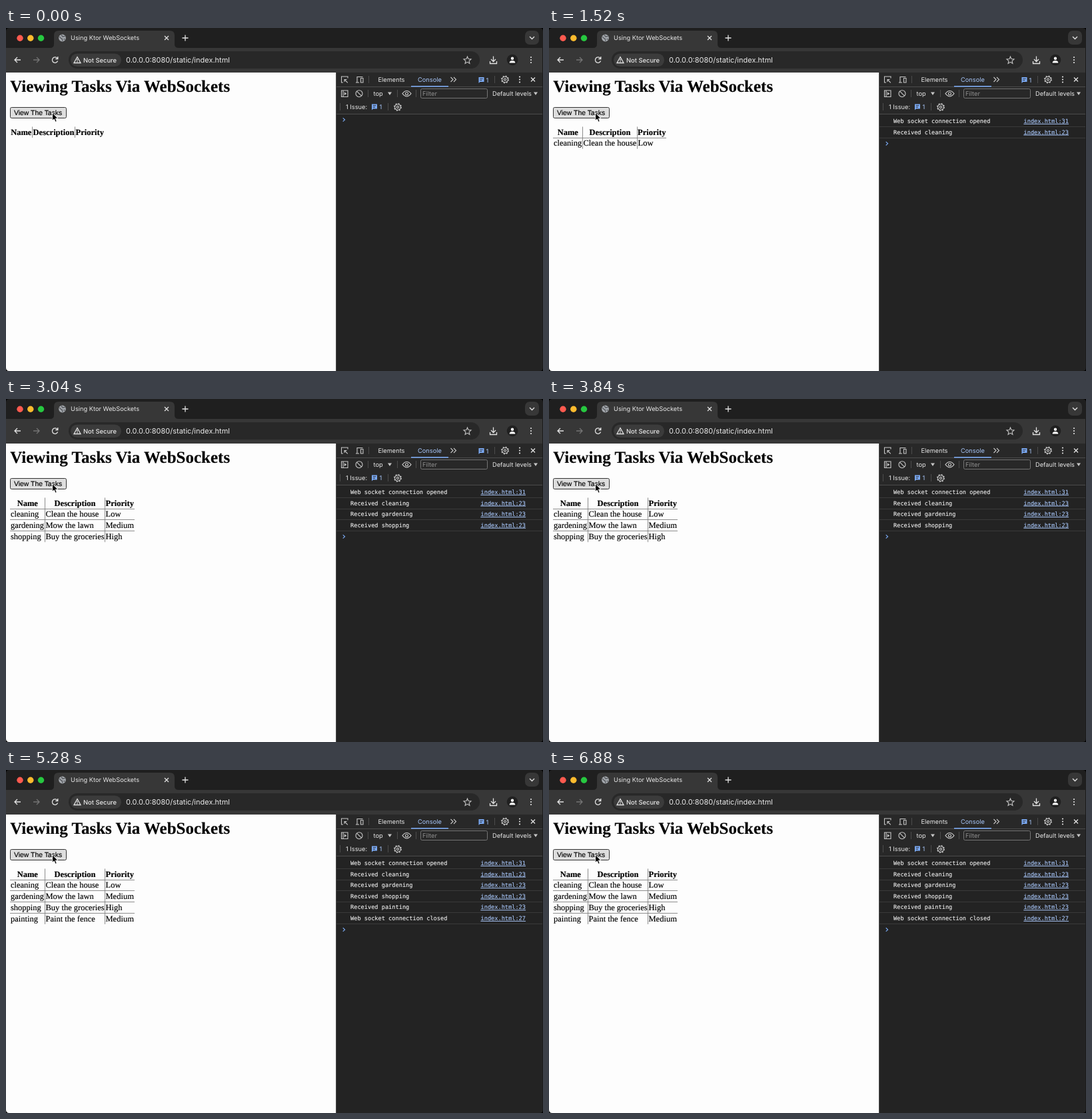
Write an HTML page that moves like this. It is 806x516 px and loops after 6.96 s.

```html
<!DOCTYPE html>
<html lang="en">
<head>
<meta charset="utf-8">
<title>Using Ktor WebSockets</title>
<style>
  html, body { margin: 0; width: 100%; height: 100%; overflow: hidden; background: #1f1f1f; }
  svg { display: block; width: 806px; height: 516px; }
  text { white-space: pre; text-rendering: geometricPrecision; }
  .ui { font: 9.25px Inter, Roboto, sans-serif; fill: #e8e8e8; }
  .ui .accent { fill: #a8c7fa; }
  .page { font: 12.5px "Liberation Serif", "Times New Roman", serif; fill: #000; }
  .page text { stroke: #000; stroke-width: .15; }
  .page .head { font-weight: bold; text-anchor: middle; }
  .page .title { font-size: 25px; font-weight: bold; }
  .page .label { font: 10.4px "Liberation Sans", Arial, sans-serif; }
  .log { font: 8.63px "DejaVu Sans Mono", monospace; fill: #f1f1f1; }
  .log text { stroke: #f1f1f1; stroke-width: .12; }
  .log .link { fill: #a8c7fa; stroke: #a8c7fa; text-decoration: underline; }
  .icon { fill: none; stroke: #c7c7c7; stroke-width: 1.1; }
  .bright { stroke: #e3e3e3; stroke-width: 1.3; }
  .blue { stroke: #7cacf8; }
  .rule { fill: none; stroke: #4c4c4c; }
  .log .rule { stroke: #3a3a3a; }
  .grid { fill: none; stroke: #808080; stroke-width: .9; }
</style>
</head>
<body>
<svg viewBox="0 0 806 516">
  <defs>
    <g id="gear" class="icon">
      <circle r="4.3"/><circle r="1.6"/>
      <circle r="5.2" stroke-width="1.5" stroke-dasharray="2 2.084"/>
    </g>
    <g id="dots" fill="#e3e3e3"><circle cy="-4" r="1.1"/><circle r="1.1"/><circle cy="4" r="1.1"/></g>
    <g id="issue">
      <path d="M-4-4H4V3H-2L-4 5Z" fill="#7cacf8"/>
      <path d="M-2.3-1.8H2.3M-2.3.6H1" stroke="#303030"/>
    </g>
    <path id="down" d="M-3-2.2H3L0 2.4Z" fill="#c7c7c7"/>
    <path id="cross" d="M-3-3 3 3M3-3-3 3"/>
  </defs>

  <!-- Tab strip -->
  <rect width="806" height="516" fill="#1f1f1f"/>
  <path d="M66 30Q72 30 72 24V11Q72 4 79 4H246Q253 4 253 11V24Q253 30 259 30Z" fill="#373737"/>
  <circle cx="21" cy="15.2" r="4.7" fill="#ff5a4f"/>
  <circle cx="36.8" cy="15.2" r="4.7" fill="#febb2e"/>
  <circle cx="52.5" cy="15.2" r="4.7" fill="#27c840"/>
  <circle cx="84.5" cy="15" r="5.4" fill="#a5a9ae"/>
  <path d="M80.5 13Q82 16 84 16L85 19.5M83 10.5 85 13 88.5 12.5M86.5 16.5 88.5 17" fill="none" stroke="#55585c" stroke-width="1.4"/>
  <text class="ui" x="97" y="18.2">Using Ktor WebSockets</text>
  <use href="#cross" x="241" y="15" class="icon bright"/>
  <path class="icon bright" d="M264.5 15H273.5M269 10.5V19.5"/>
  <rect x="779" y="4" width="21" height="21" rx="7" fill="#373737"/>
  <path class="icon bright" d="M786 13 789.5 16.5 793 13"/>

  <!-- Toolbar -->
  <rect y="30" width="806" height="37" fill="#373737"/>
  <path class="icon bright" d="M22 48H13M17 44 13 48 17 52"/>
  <path class="icon bright" d="M41 48H50M46 44 50 48 46 52" style="stroke:#747474"/>
  <path class="icon bright" d="M77.3 46A4.2 4.2 0 1 0 77.6 49.5M77.8 43V46.5H74.3"/>
  <rect x="94" y="35" width="617" height="26" rx="13" fill="#282828"/>
  <rect x="97" y="38.5" width="76" height="19.5" rx="9.7" fill="#3b3b3b"/>
  <path class="icon bright" d="M107 43.5 112 52.5H102ZM107 46.5V49.3M107 50V51.2"/>
  <text class="ui" x="116" y="51.6" style="font-size:9.4px;font-weight:500">Not Secure</text>
  <text class="ui" x="180" y="52" style="font-size:11px">0.0.0.0:8080/static/index.html</text>
  <path class="icon" d="M692.5 43 694 46.6 698 47 695 49.6 695.9 53.4 692.5 51.4 689.1 53.4 690 49.6 687 47 691 46.6Z"/>
  <path class="icon bright" d="M731.5 42.5V50M728 47 731.5 50.5 735 47M726.5 50V53.5H736.5V50"/>
  <circle cx="760" cy="48" r="8.3" fill="#202020"/>
  <circle cx="760" cy="45.8" r="2.2" fill="#fff"/>
  <path d="M755.6 52.5Q755.6 49 760 49T764.4 52.5Z" fill="#fff"/>
  <use href="#dots" x="788" y="48"/>

  <!-- Page -->
  <rect y="67" width="495" height="449" fill="#fdfdfd"/>
  <g class="page">
    <text class="title" x="6.2" y="95.8">Viewing Tasks Via WebSockets</text>
    <rect x="6.5" y="119.5" width="84" height="16" rx="2" fill="#dedede" stroke="#333"/>
    <text class="label" x="12" y="131.1">View The Tasks</text>
    <g id="table"></g>
  </g>
  <path d="M69.5 127.5V139.3L72.2 136.9 74.2 141.3 76.2 140.4 74.3 136.2 77.8 136Z" stroke="#fff" stroke-width=".9"/>

  <!-- Console panel -->
  <rect x="495" y="67" width="311" height="449" fill="#232323"/>
  <rect x="496" y="67" width="309" height="62" fill="#282828"/>
  <path class="rule" d="M495.5 67V516M496 88.5H805M496 129.5H805M544.5 72V83M733.5 72V83M543.5 93V104M587.5 93V104M615.5 93V104M501.5 113V124M573.5 113V124"/>
  <path d="M608 87.7H664" stroke="#7cacf8" stroke-width="1.4"/>
  <path class="icon" d="M513 75.5V73H503.5V82H506M512.8 82.3 508 77.5M508 81V77.5H511.5"/>
  <path class="icon" d="M527 81.5V73.5H535.5M525 82H530M532.5 75.5H536V82H532.5Z"/>
  <path class="icon" d="M667.5 74 671 77.5 667.5 81M672 74 675.5 77.5 672 81"/>
  <use href="#issue" x="713.5" y="78"/>
  <use href="#gear" x="749" y="77.5"/>
  <use href="#dots" x="771" y="77.5"/>
  <use href="#cross" x="791" y="77.5" class="icon bright"/>
  <path class="icon" d="M503.5 94H513V103.5H503.5ZM506 94V103.5"/>
  <path d="M507.8 96.3V101.2L511.3 98.7Z" fill="#c7c7c7"/>
  <path class="icon" d="M535 98.7A5 5 0 1 1 525 98.7A5 5 0 1 1 535 98.7M526.5 95.2 533.5 102.2"/>
  <use href="#down" x="576" y="98.7"/>
  <path class="icon" d="M595 98.7Q601.5 90.2 608 98.7Q601.5 107.2 595 98.7Z"/>
  <circle class="icon" cx="601.5" cy="98.7" r="2"/>
  <rect x="622.5" y="91.5" width="100" height="14" rx="2" fill="#282828" stroke="#757575"/>
  <use href="#down" x="795" y="98.7"/>
  <use href="#issue" x="553" y="118.5"/>
  <use href="#gear" x="588" y="119"/>
  <g class="ui">
    <text x="558.5" y="81">Elements</text>
    <text x="618" y="81" class="accent">Console</text>
    <text x="720.5" y="81.6" class="accent">1</text>
    <text x="551.5" y="102">top</text>
    <text x="625" y="102" style="fill:#8f8f8f">Filter</text>
    <text x="730" y="102">Default levels</text>
    <text x="510" y="122.3">1 Issue:</text>
    <text x="560.5" y="122.3" class="accent">1</text>
  </g>
  <g id="log" class="log"></g>
  <path d="M805.5 30V516" stroke="#1b1b1b"/>
  <path d="M0 511V516H5Q0 516 0 511M806 511V516H801Q806 516 806 511M0 5V0H5Q0 0 0 5M806 5V0H801Q806 0 806 5"/>
</svg>

<script>
  const LOOP = 6960;
  const STARTS = [0, 1040, 2000, 3040, 4080, 5120];
  const HEADS = ["Name", "Description", "Priority"];
  const TASKS = [
    ["cleaning", "Clean the house", "Low"],
    ["gardening", "Mow the lawn", "Medium"],
    ["shopping", "Buy the groceries", "High"],
    ["painting", "Paint the fence", "Medium"]
  ];
  // Column edges for an empty table and for one, two and more rows
  const EDGES = [[6, 39.5, 103.5, 148], [6, 50.5, 132.5, 176], [6, 58.5, 140.5, 185], [6, 58.5, 148.5, 193]];
  const LOG = [
    ["Web socket connection opened", 31],
    ...TASKS.map(([name]) => ["Received " + name, 23]),
    ["Web socket connection closed", 27]
  ];
  const ROW = 16.75, LOG_ROW = 16.6;

  const text = (x, y, s, cls = "") => `<text x="${x}" y="${y}" class="${cls}">${s}</text>`;
  const line = (d, cls) => `<path d="${d}" class="${cls}"/>`;

  function drawTable(count) {
    const edges = EDGES[Math.min(count, 3)];
    const bottom = 165 + ROW * count;
    let out = HEADS.map((s, i) => text((edges[i] + edges[i + 1]) / 2, 160.6, s, "head")).join("");
    out += line(`M${edges[1]} 148.5V${bottom}M${edges[2]} 148.5V${bottom}`, "grid");
    TASKS.slice(0, count).forEach((row, r) => {
      const y = Math.floor(165 + ROW * r) + .5;
      out += line(`M6 ${y}H${edges[3]}`, "grid");
      row.forEach((s, i) => out += text(edges[i] + 1, 177.3 + ROW * r, s));
    });
    return out;
  }

  function drawLog(count) {
    let out = "";
    LOG.slice(0, count).forEach(([s, at], i) => {
      const y = 143 + LOG_ROW * i;
      out += text(517, y, s) + text(712.5, y, "index.html:" + at, "link");
      out += line(`M496 ${Math.floor(y + 5.5) + .5}H805`, "rule");
    });
    const y = count ? 140.6 + LOG_ROW * count : 138;
    return out + line(`M505.7 ${y - 2.7}L508.6 ${y}L505.7 ${y + 2.7}`, "icon blue");
  }

  const table = document.getElementById("table");
  const log = document.getElementById("log");
  let shown = -1;

  function tick() {
    const t = performance.now() % LOOP;
    const step = STARTS.filter(s => s <= t).length - 1;
    if (step !== shown) {
      shown = step;
      table.innerHTML = drawTable(Math.min(step, TASKS.length));
      log.innerHTML = drawLog(step && step + 1);
    }
    requestAnimationFrame(tick);
  }
  tick();
</script>
</body>
</html>
```
